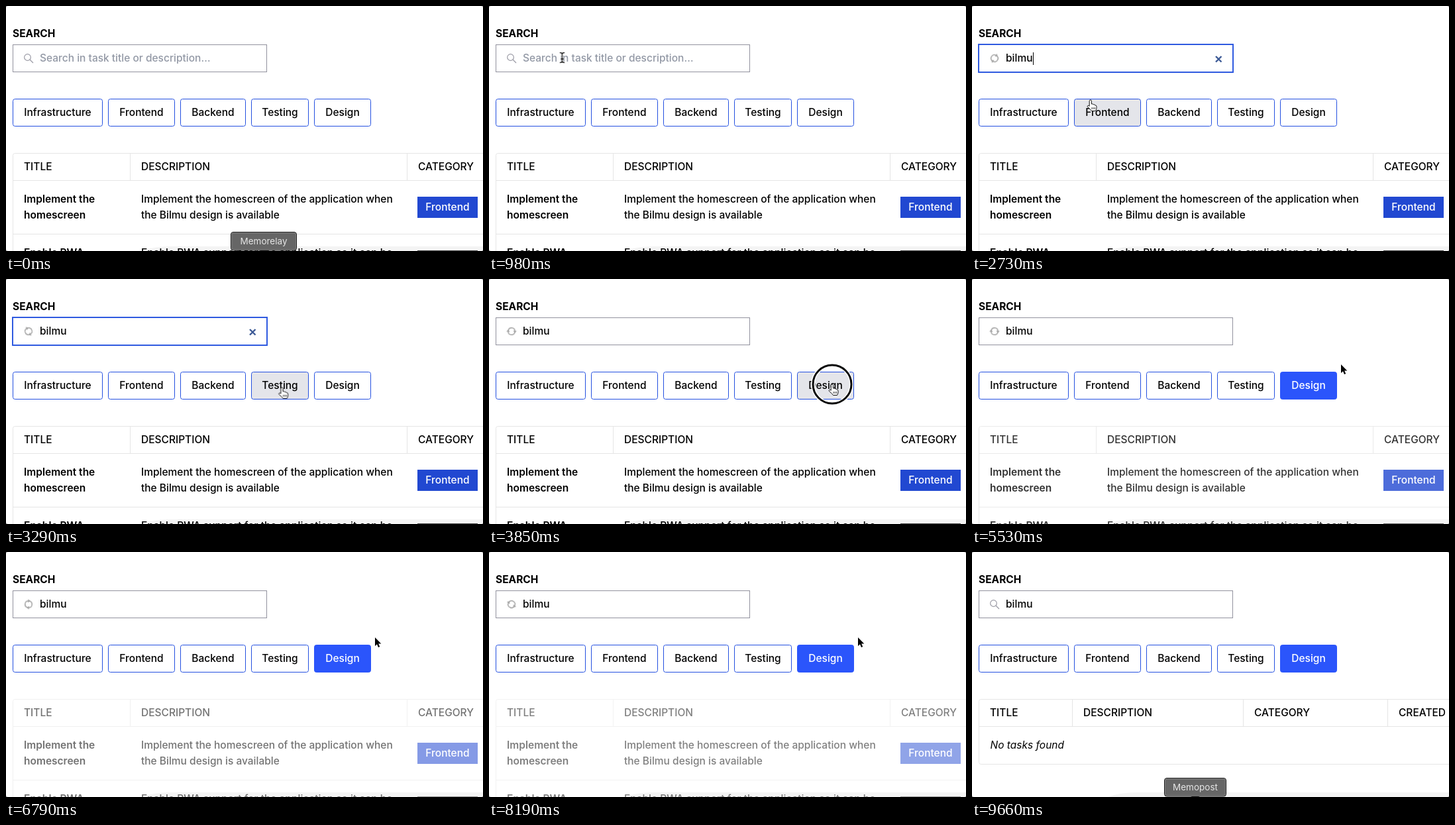
An HTML page that plays this animation: 720x370 px, repeating every 9800 ms.

```html
<!DOCTYPE html>
<html lang="en">
<head>
<meta charset="utf-8">
<title>Task search</title>
<style>
html, body { margin: 0; width: 100%; height: 100%; overflow: hidden; background: #8a8a8a; }
#stage {
  position: relative; width: 720px; height: 370px; overflow: hidden;
  background: #fff; border-radius: 3px;
  font: 450 15.5px/24px Inter, "Liberation Sans", sans-serif;
}
svg { position: absolute; left: 0; top: 0; }
.med { font-weight: 500; }
.semi { font-weight: 600; }
.bold { font-weight: 700; }
.line { fill: none; stroke: #e5e5e5; }
.mid { text-anchor: middle; }
.btn rect { fill: #fff; stroke: #2450e0; }
.tip rect { fill: #666; stroke: #161616; }
.tip path { fill: #161616; }
.tip text { fill: #e6e6e6; font-size: 13.5px; font-weight: 400; text-anchor: middle; }
.tip .shine { fill: none; stroke: #858585; }

/* every part shares one loop; steps are hard cuts */
.s, .btn rect, #query i { animation: 9.8s step-end infinite; }
.l { animation: 9.8s linear infinite; }

#hint { animation-name: hint; }
#lens { animation-name: lens; }
#sync { animation-name: sync; }
#spin { animation-name: spin; }
#focus { animation-name: focus; }
#clear { animation-name: clear; }
#tasks { animation-name: tasks; }
#empty { animation-name: empty; }
#mouse { animation-name: mouse; }
#arrow { animation-name: arrow; }
#beam { animation-name: beam; }
#hand { animation-name: hand; }
#ring { animation-name: ring; }
#tipA { animation-name: tipA; }
#tipB { animation-name: tipB; }
#front rect { animation-name: front; }
#back rect { animation-name: back; }
#test rect { animation-name: test; }
#design rect { animation-name: design; }
#design text { animation-name: label; }

#query { position: absolute; left: 51px; top: 67px; white-space: nowrap; }
#query i { font-style: normal; font-size: 0; }
#query i:nth-child(1) { animation-name: key1; }
#query i:nth-child(2) { animation-name: key2; }
#query i:nth-child(3) { animation-name: key3; }
#query i:nth-child(4) { animation-name: key4; }
#query i:nth-child(5) { animation-name: key5; }
#caret { position: absolute; top: 3px; width: 1px; height: 19px; background: #000; animation-name: caret; }

@keyframes key1 { 17.857%, 100% { font-size: 15.5px; } }
@keyframes key2 { 19.286%, 100% { font-size: 15.5px; } }
@keyframes key3 { 20.714%, 100% { font-size: 15.5px; } }
@keyframes key4 { 22.143%, 100% { font-size: 15.5px; } }
@keyframes key5 { 23.571%, 100% { font-size: 15.5px; } }
@keyframes caret {
  0%, 16.429%, 28.673%, 38.8%, 100% { opacity: 0; }
  11.429%, 17.857%, 33.775% { opacity: 1; }
}
@keyframes hint { 0% { opacity: 1; } 17.857%, 100% { opacity: 0; } }
@keyframes lens { 0%, 87.143%, 100% { opacity: 1; } 17.857% { opacity: 0; } }
@keyframes sync { 0%, 87.143%, 100% { opacity: 0; } 17.857% { opacity: 1; } }
@keyframes spin { from { transform: rotate(80deg); } to { transform: rotate(2180deg); } }
@keyframes focus { 0%, 39.286%, 100% { opacity: 0; } 10.714% { opacity: 1; } }
@keyframes clear { 0%, 39.286%, 100% { opacity: 0; } 17.857% { opacity: 1; } }
@keyframes tasks {
  0%, 46.33% { opacity: 1; }
  71.84%, 87.142% { opacity: .5; }
  87.143%, 100% { opacity: 0; }
}
@keyframes empty { 0% { opacity: 0; } 87.143%, 100% { opacity: 1; } }
@keyframes front {
  0%, 4.04%, 30.17%, 100% { fill: #fff; }
  3.6%, 27.38% { fill: #e4e5ea; }
}
@keyframes back { 0%, 32.4%, 100% { fill: #fff; } 30.34% { fill: #e4e5ea; } }
@keyframes test { 0%, 34.41%, 100% { fill: #fff; } 32.59% { fill: #e4e5ea; } }
@keyframes design {
  0% { fill: #fff; stroke: #2450e0; }
  34.59% { fill: #e4e5ea; stroke: #2450e0; }
  41.429%, 100% { fill: #2b55fb; stroke: #2b55fb; }
}
@keyframes label { 0% { fill: #000; } 41.429%, 100% { fill: #fff; } }
@keyframes mouse {
  0%, .714% { transform: translate(390px, 378px); }
  3.5% { transform: translate(215px, 190px); }
  5% { transform: translate(132px, 52px); }
  6.429%, 9.99% { transform: translate(120px, 78px); }
  10%, 23.571% { transform: translate(110.5px, 78px); }
  27.5%, 28.571% { transform: translate(179px, 142px); }
  32.14% { transform: translate(348px, 167px); }
  35.714%, 44.9% { transform: translate(518px, 159px); }
  48.98%, 92.5% { transform: translate(557px, 129px); }
  94.5% { transform: translate(500px, 215px); }
  97.143%, 100% { transform: translate(365px, 373px); }
}
@keyframes arrow {
  0%, 4.04%, 24.9%, 47.57%, 100% { opacity: 1; }
  3.6%, 4.46%, 27.38% { opacity: 0; }
}
@keyframes beam {
  0%, 17.857%, 24.9%, 100% { opacity: 0; }
  4.46%, 23.571% { opacity: 1; }
}
@keyframes hand {
  0%, 4.04%, 47.57%, 100% { opacity: 0; }
  3.6%, 27.38% { opacity: 1; }
}
@keyframes ring { 0%, 41.429%, 100% { opacity: 0; } 39.286% { opacity: 1; } }
@keyframes tipA { 0% { opacity: 1; } 1.429%, 100% { opacity: 0; } }
@keyframes tipB { 0% { opacity: 0; } 98.571%, 100% { opacity: 1; } }
</style>
</head>
<body>
<div id="stage">
  <svg width="720" height="370">
    <path d="M206 370Q222 363 250 363H720V370Z" fill="#f4f4f4"/>

    <text class="bold" x="10" y="47">SEARCH</text>
    <rect x="10.5" y="58.5" width="383" height="41" fill="#fff" stroke="#92929e"/>
    <rect id="focus" class="s" x="10" y="58" width="384" height="42" fill="#fff" stroke="#2f5ae0" stroke-width="2"/>
    <text id="hint" class="s" x="51" y="84" fill="#9298a5">Search in task title or description…</text>
    <g id="lens" class="s" fill="none" stroke="#9a9aa5" stroke-width="1.2">
      <circle cx="32.5" cy="77.5" r="4.8"/>
      <path d="M36 81L41 86"/>
    </g>
    <g id="sync" class="s">
      <g transform="translate(34 79)">
        <g id="spin" class="l">
          <g id="half">
            <path d="M-5-1A5.1 5.1 0 0 1 5.1-.5" fill="none" stroke="#a6a6a6" stroke-width="1.6"/>
            <path d="M2.3-1.2H7.9L5.1 2.2Z" fill="#a6a6a6"/>
          </g>
          <use href="#half" transform="rotate(180)"/>
        </g>
      </g>
    </g>
    <path id="clear" class="s" d="M368 76L376.5 84.5M376.5 76L368 84.5" stroke="#3d5a96" stroke-width="2.4"/>

    <g class="mid">
      <g class="btn"><rect x="10.5" y="140.5" width="135" height="41" rx="3"/><text x="78" y="166">Infrastructure</text></g>
      <g class="btn" id="front"><rect x="154.5" y="140.5" width="100" height="41" rx="3"/><text x="204.5" y="166">Frontend</text></g>
      <g class="btn" id="back"><rect x="263.5" y="140.5" width="98" height="41" rx="3"/><text x="312.5" y="166">Backend</text></g>
      <g class="btn" id="test"><rect x="370.5" y="140.5" width="86" height="41" rx="3"/><text x="413.5" y="166">Testing</text></g>
      <g class="btn" id="design"><rect x="465.5" y="140.5" width="85" height="41" rx="3"/><text class="s" x="508" y="166">Design</text></g>
    </g>

    <g id="tasks" class="l">
      <path class="line" d="M10.5 370V225.5Q10.5 222.5 13.5 222.5H720M10.5 263.5H720M10.5 344.5H720M187.5 223V263M605.5 223V263"/>
      <g class="med">
        <text x="27" y="248">TITLE</text>
        <text x="204" y="248">DESCRIPTION</text>
        <text x="622" y="248">CATEGORY</text>
      </g>
      <g class="semi">
        <text x="27" y="297">Implement the</text>
        <text x="27" y="321">homescreen</text>
        <text x="27" y="378">Enable PWA</text>
      </g>
      <text x="204" y="297">Implement the homescreen of the application when</text>
      <text x="204" y="321">the Bilmu design is available</text>
      <text x="204" y="378">Enable PWA support for the application so it can be</text>
      <rect x="621" y="288" width="91" height="32" fill="#2148d1"/>
      <text class="mid med" x="666.5" y="309" fill="#fff">Frontend</text>
      <rect x="621" y="369" width="91" height="32" fill="#484848"/>
    </g>

    <g id="empty" class="s">
      <path class="line" d="M720 222.5H13.5Q10.5 222.5 10.5 225.5V317.5Q10.5 320.5 13.5 320.5H720M10.5 263.5H720M151.5 223V263M409.5 223V263M627.5 223V263"/>
      <g class="med">
        <text x="27" y="248">TITLE</text>
        <text x="168" y="248">DESCRIPTION</text>
        <text x="426" y="248">CATEGORY</text>
        <text x="644" y="248">CREATED</text>
      </g>
      <text x="27.5" y="297" font-style="italic">No tasks found</text>
    </g>
  </svg>

  <div id="query"><i>b</i><i>i</i><i>l</i><i>m</i><i>u</i><span id="caret" class="s"></span></div>

  <svg width="720" height="370">
    <g id="tipA" class="s tip">
      <rect x="339.5" y="341.5" width="99" height="27.5" rx="3.5"/>
      <rect class="shine" x="340.5" y="342.5" width="97" height="25.5" rx="2.5"/>
      <path d="M382 369H396L394 370H384Z"/>
      <text x="389" y="360">Memorelay</text>
    </g>
    <g id="tipB" class="s tip">
      <rect x="290.5" y="341.5" width="93" height="27.5" rx="3.5"/>
      <rect class="shine" x="291.5" y="342.5" width="91" height="25.5" rx="2.5"/>
      <path d="M330 369H344L342 370H332Z"/>
      <text x="337" y="360">Memopost</text>
    </g>

    <g id="ring" class="s" fill="none">
      <circle cx="518" cy="159" r="29" stroke="#fff" stroke-width="6"/>
      <circle cx="518" cy="159" r="29" stroke="#0a0a0a" stroke-width="3"/>
    </g>

    <g id="mouse" class="l">
      <path id="arrow" class="s" d="M0 0V13L3 10.2 5 15 7.2 14 5.2 9.5H9.3Z" stroke="#fff" stroke-width="2" paint-order="stroke"/>
      <g id="beam" class="s" fill="none">
        <path id="bar" d="M-3.5-7.5Q0-7.5 0-5.5Q0-7.5 3.5-7.5M0-5.5V5.5M-3.5 7.5Q0 7.5 0 5.5Q0 7.5 3.5 7.5M-2 2H2" stroke="#fff" stroke-width="3"/>
        <path d="M-3.5-7.5Q0-7.5 0-5.5Q0-7.5 3.5-7.5M0-5.5V5.5M-3.5 7.5Q0 7.5 0 5.5Q0 7.5 3.5 7.5M-2 2H2" stroke="#111" stroke-width="1.3"/>
      </g>
      <g id="hand" class="s" stroke="#111" stroke-linejoin="round">
        <path d="M-1.8 1.5a1.6 1.6 0 0 1 3.2 0V6q2.4-.6 2.8.8 2.2-.4 2.6 1 2.2 0 2.2 2V12q0 2-1.5 4.5H1.5Q-.5 13.5-4.5 10.5q-1-1.5.5-2.2 1.2-.3 2.2 1z" fill="#fff"/>
        <path d="M2 11V14M4.2 11V14M6.4 11V14" stroke-width=".8"/>
      </g>
    </g>
  </svg>
</div>
</body>
</html>
```
